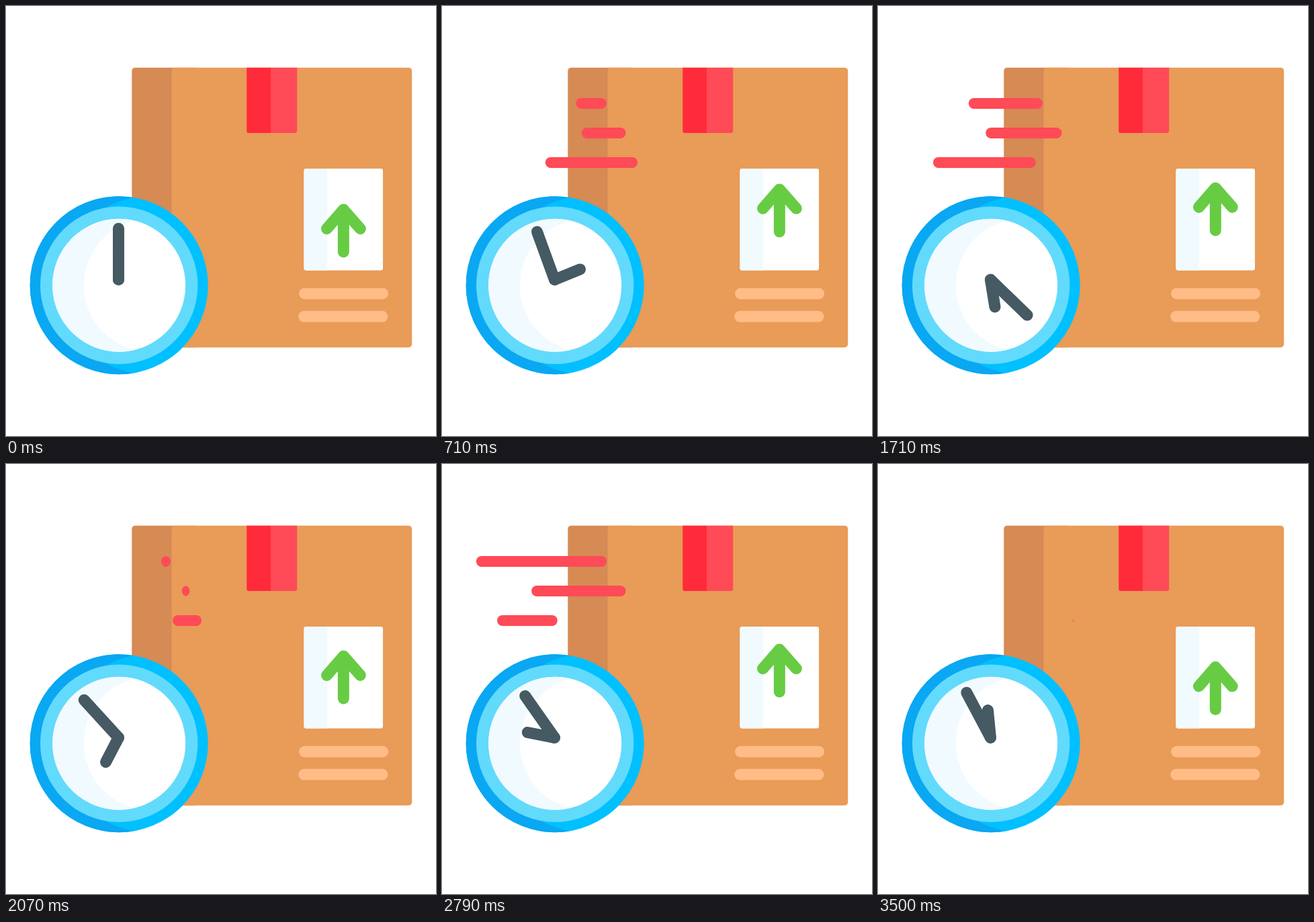
Animation, 640 px wide and 640 px high, one loop 3.57 s. Source, as an HTML page:

```html
<!DOCTYPE html>
<html lang="en">
<head>
<meta charset="utf-8">
<title>Parcel and clock</title>
<style>
  html, body { margin: 0; width: 100%; height: 100%; overflow: hidden; background: #fff; }
  svg { display: block; width: 100%; height: 100%; }
  .ink { fill: none; stroke-width: 17; stroke-linecap: round; stroke-linejoin: round; }
</style>
</head>
<body>
<svg viewBox="0 0 640 640">
  <defs id="defs"></defs>

  <!-- parcel -->
  <rect x="187.3" y="91.7" width="100" height="416.5" rx="5" fill="#d68a54"/>
  <rect x="246.5" y="91.7" width="357.7" height="416.5" rx="5" fill="#e99b58"/>
  <path d="M358.2 91.7H394V189H361.2a3 3 0 0 1-3-3z" fill="#ff2b3a"/>
  <path d="M394 91.7H433.2V186a3 3 0 0 1-3 3H394z" fill="#ff4a57"/>

  <!-- label -->
  <rect x="443.5" y="242" width="117.5" height="151.5" rx="3" fill="#fff"/>
  <path d="M478 242H446.5a3 3 0 0 0-3 3V390.5a3 3 0 0 0 3 3H478z" fill="#f1faff"/>
  <path id="arrow" class="ink" stroke="#67cc44" d="M502.3 303V366M477.5 331.5L502.3 303L527.3 331.5"/>
  <g fill="#ffbc86">
    <rect x="436" y="419.7" width="133.2" height="16.8" rx="8.4"/>
    <rect x="435.2" y="453.8" width="133.2" height="16.8" rx="8.4"/>
  </g>

  <g id="streaks" fill="#ff4a57"></g>

  <!-- clock -->
  <circle cx="168.2" cy="415.7" r="132.5" fill="#00c0ff"/>
  <path d="M190.5 285.1A132.5 132.5 0 1 0 190.5 546.3A132.5 132.5 0 0 1 190.5 285.1z" fill="#0aa7f2"/>
  <circle cx="168.2" cy="415.7" r="117.2" fill="#62dafc"/>
  <circle cx="168.2" cy="415.7" r="99" fill="#fff"/>
  <path d="M191.5 319.5A99 99 0 1 0 191.5 511.9A99 99 0 0 1 191.5 319.5z" fill="#f1faff"/>
  <g class="ink" stroke="#455a62">
    <path id="hour" d="M167.5 407.3v-41"/>
    <path id="minute" d="M167.5 407.3v-76"/>
  </g>
</svg>

<script>
const LOOP = 3570, STEP = 71.4;      // the picture is held for one step at a time
const SPAN = 3500, LEAD = 53;        // moving part and the rest before it
const CYCLES = 3;
const $ = id => document.getElementById(id);
const clamp = v => Math.min(1, Math.max(0, v));
const smooth = v => v * v * (3 - 2 * v);

// cubic-bezier(x1, 0, x2, 1)
const ease = (x1, x2) => x => {
  let lo = 0, hi = 1;
  for (let i = 0; i < 30; i++) {
    const s = (lo + hi) / 2, u = 1 - s;
    if (3 * x1 * s * u * u + 3 * x2 * s * s * u + s * s * s < x) lo = s; else hi = s;
  }
  return smooth((lo + hi) / 2);
};

// enters by a third of the cycle, then leaves, both at even speed
const twoPart = p => p < .335 ? p / .67 : Math.min(1, .5 + (p - .335) / .86);

function node(tag, attrs, parent) {
  const el = document.createElementNS('http://www.w3.org/2000/svg', tag);
  for (const k in attrs) el.setAttribute(k, attrs[k]);
  return parent.appendChild(el);
}

// each streak shows through a window of its own shape that slides across it
const streaks = [
  { x: 35, end: 245, y: 137, move: ease(.52, .03) },
  { x: 131, end: 273.5, y: 181, move: twoPart },
  { x: 82, end: 291, y: 225, move: ease(.53, .43) }
].map(({ x, end, y, move }, i) => {
  const w = end - x;
  const box = { x, y, width: w, height: 16.2, rx: 8.1 };
  const clip = node('clipPath', { id: 'win' + i }, $('defs'));
  const win = node('rect', box, clip);
  node('rect', { ...box, 'clip-path': `url(#win${i})` }, $('streaks'));
  return p => win.setAttribute('x', x - w + 2 * w * move(p));
});

function draw(time) {
  const n = Math.floor((time % LOOP + 5) / STEP) % 50;
  const k = clamp((n * STEP - LEAD) / SPAN);
  const p = k * CYCLES % 1;
  const turn = (id, deg) => $(id).setAttribute('transform', `rotate(${deg} 167.5 407.3)`);
  turn('hour', 360 * k);
  turn('minute', 1800 * k);
  const lift = 33 * smooth(p < .47 ? p / .47 : (1 - p) / .53);
  $('arrow').setAttribute('transform', `translate(0 ${-lift})`);
  streaks.forEach(slide => slide(p));
}

const start = performance.now();
function tick(now) {
  draw(Math.max(0, now - start));
  requestAnimationFrame(tick);
}
draw(0);
requestAnimationFrame(tick);
</script>
</body>
</html>
```
